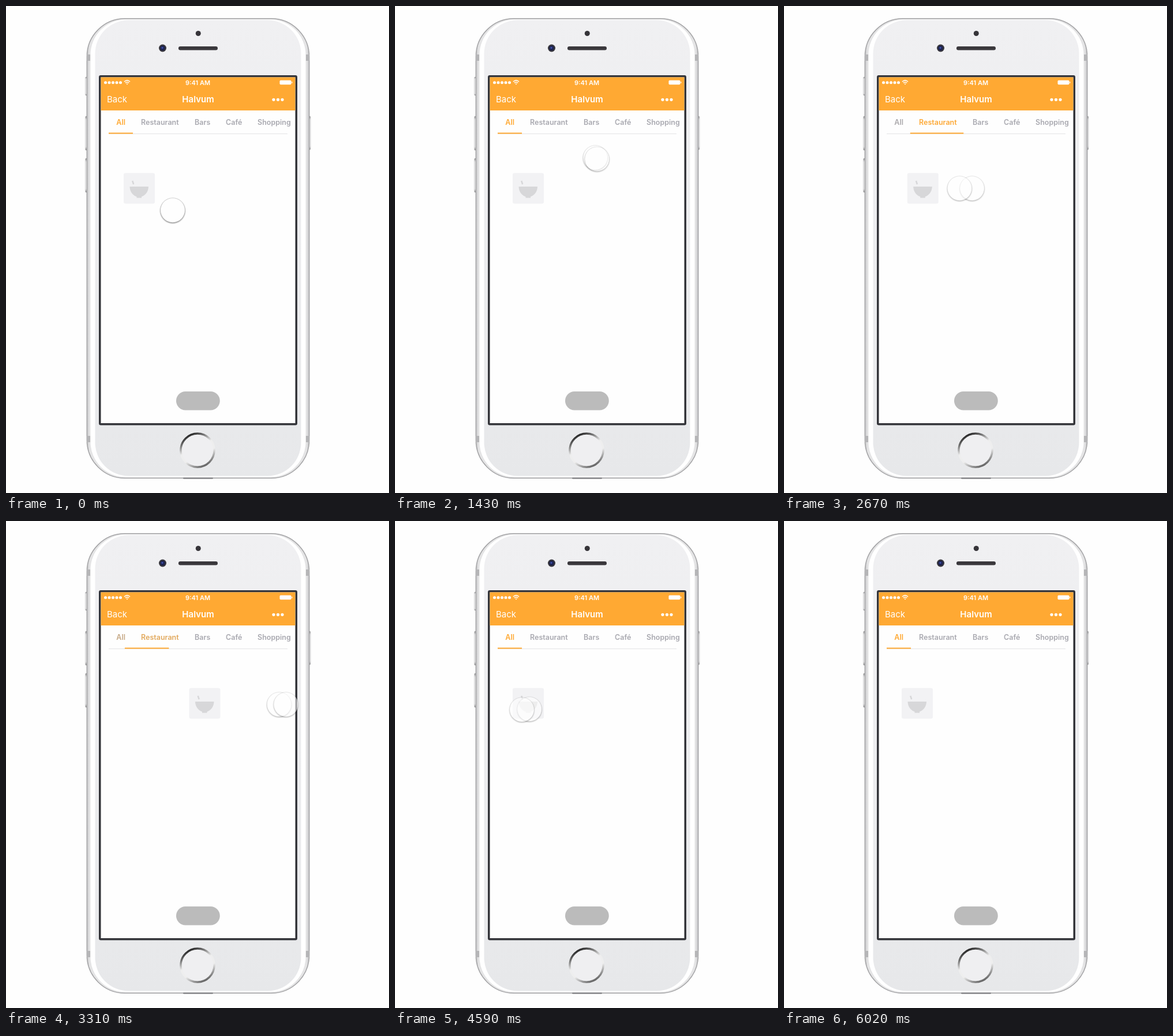
An HTML page that plays this animation: 664 px wide and 844 px high, repeating every 6440 ms.

```html
<!DOCTYPE html>
<html lang="en">
<head>
<meta charset="utf-8">
<title>Swipe between tabs</title>
<style>
  html, body { margin: 0; width: 100%; height: 100%; overflow: hidden; background: #fefefe; }
  svg { display: block; width: 664px; height: 844px; font-family: Inter, Roboto, sans-serif; }
  .tabs { font-size: 12.5px; font-weight: 600; fill: #a9a9b0; }
  .bar { fill: #fff; }
  .touch {
    fill: #fff; stroke: rgba(0, 0, 0, .16); stroke-width: .8; opacity: .55;
    filter: drop-shadow(0 1px 1.3px rgba(0, 0, 0, .55));
  }
</style>
</head>
<body>
<svg viewBox="0 0 664 844">
  <defs>
    <linearGradient id="rim">
      <stop offset="0" stop-color="#c4c4c6"/>
      <stop offset=".012" stop-color="#e4e4e5"/>
      <stop offset=".988" stop-color="#e4e4e5"/>
      <stop offset="1" stop-color="#c4c4c6"/>
    </linearGradient>
    <linearGradient id="face" x2="0" y2="1">
      <stop offset="0" stop-color="#f0f0f2"/>
      <stop offset="1" stop-color="#e7e8ea"/>
    </linearGradient>
    <linearGradient id="key" x2="0" y2="1">
      <stop offset="0" stop-color="#858587"/>
      <stop offset=".1" stop-color="#ececed"/>
      <stop offset=".9" stop-color="#ececed"/>
      <stop offset="1" stop-color="#858587"/>
    </linearGradient>
    <linearGradient id="ring" x1=".25" y1="0" x2=".75" y2="1">
      <stop offset="0" stop-color="#161616"/>
      <stop offset=".2" stop-color="#777"/>
      <stop offset=".42" stop-color="#eee"/>
      <stop offset=".65" stop-color="#eee"/>
      <stop offset="1" stop-color="#555"/>
    </linearGradient>
    <clipPath id="screen"><rect x="164" y="123" width="337.5" height="600"/></clipPath>
    <g id="card">
      <rect x="204" y="289.5" width="54" height="53" rx="3" fill="#f2f2f4"/>
      <g fill="#d7d7d9">
        <path d="M214.5 313h32.5c0 9-6 15.500-12 17.500v2h-8.500v-2c-6-2-12-8.500-12-17.500z"/>
        <path d="M219.200 303l2 6" stroke="#d7d7d9" stroke-width="2.5"/>
      </g>
    </g>
  </defs>

  <!-- Phone body -->
  <g fill="url(#key)" stroke="#bbb" stroke-width=".6">
    <rect x="137.500" y="123" width="5" height="32" rx="1.5"/>
    <rect x="137.500" y="191" width="5" height="59" rx="1.5"/>
    <rect x="137.500" y="264" width="5" height="59" rx="1.5"/>
    <rect x="523.500" y="191" width="4.5" height="58" rx="1.5"/>
  </g>
  <rect x="140.300" y="21.800" width="385.400" height="796.500" rx="66" fill="url(#rim)" stroke="#a4a4a6" stroke-width="1.5"/>
  <path d="M140 84h6v11h-6zM520 84h6v11h-6zM140 745h6v11h-6zM520 745h6v11h-6z" fill="#b5b5b7"/>
  <rect x="146.500" y="23.500" width="373" height="793" rx="61" fill="#fff"/>
  <rect x="154.500" y="24.500" width="357" height="790" rx="58" fill="url(#face)"/>
  <rect x="307" y="817.500" width="52" height="2" rx="1" fill="#77777a"/>
  <circle cx="333.300" cy="47.500" r="4.5" fill="#363439"/>
  <rect x="299" y="70" width="68" height="6.500" rx="3.2" fill="#3a383c"/>
  <circle cx="271.500" cy="73" r="6.5" fill="#37363d"/>
  <circle cx="271.500" cy="73" r="4" fill="#1b2150"/>
  <circle cx="271" cy="72.500" r="1.8" fill="#3c4ea0"/>
  <circle cx="332" cy="770" r="29" fill="#efeff1" stroke="url(#ring)" stroke-width="3.4"/>
  <rect x="162.750" y="121.750" width="340.500" height="603" rx="1.5" fill="#fefefe" stroke="#333439" stroke-width="3.5"/>

  <!-- Header -->
  <path d="M164.500 123.500H501.500V181H164.500z" fill="#ffa933"/>
  <g class="bar">
    <g id="signal"></g>
    <path d="M205 131.200q5-4.600 10 0M206.900 133.400q3.100-2.800 6.200 0" fill="none" stroke="#fff" stroke-width="1.5"/>
    <path d="M208.400 134.800q1.600-1.300 3.200 0l-1.600 1.700z"/>
    <text x="332.500" y="136.500" font-size="11" font-weight="600" text-anchor="middle">9:41 AM</text>
    <rect x="474.500" y="128.700" width="20" height="7.600" rx="1.8"/>
    <rect x="495.200" y="131" width="1.2" height="3" rx=".6"/>
    <text x="175" y="166.500" font-size="15">Back</text>
    <text x="333" y="166.500" font-size="15" font-weight="600" text-anchor="middle">Halvum</text>
    <g id="more"></g>
  </g>

  <!-- Tabs -->
  <g class="tabs">
    <text id="all" x="191.300" y="206">All</text>
    <text id="food" x="234" y="206">Restaurant</text>
    <text x="327" y="206">Bars</text>
    <text x="381" y="206">Café</text>
    <text x="436" y="206">Shopping</text>
  </g>
  <path d="M178 221.500H488" stroke="#e3e3e5"/>
  <rect id="line" y="219.500" height="2" fill="#ffa933"/>

  <g clip-path="url(#screen)">
    <g id="pages">
      <use href="#card"/>
      <use href="#card" x="338"/>
    </g>
  </g>
  <rect x="295" y="668" width="75.800" height="32.500" rx="16.2" fill="#bbb"/>

  <circle class="touch" r="21.2"/>
  <circle class="touch" r="21.2"/>
</svg>
<script>
const LOOP = 6440, PAGE = 338, PEEK = 200, LAG = 40, GONE = 6020;
const GRAY = [169, 169, 176], ORANGE = [255, 169, 51];
const $ = id => document.getElementById(id);

// Turning points of the hand: time, x, y
const hand = [
  [0, 289, 354], [920, 304, 348], [1290, 344, 260], [1930, 394, 302],
  [2020, 371, 308], [2250, 262, 314], [2590, 335, 316], [2840, 211, 316],
  [3340, 488, 318], [3900, 381, 317], [4050, 379, 317], [4792, 185, 329],
  [5152, 479, 336], [5500, 321, 331], [GONE, 611, 890]
];

const mix = (a, b, p) => a + (b - a) * p;
const tint = p => `rgb(${GRAY.map((g, i) => Math.round(mix(g, ORANGE[i], p)))})`;

function ease(t, from, to) {
  const u = Math.min(1, Math.max(0, (t - from) / (to - from)));
  return u * u * (3 - 2 * u);
}

// Each leg eases between two turning points
function handAt(t) {
  const next = hand.findIndex(key => key[0] > t);
  if (next < 1) return hand[t < 0 ? 0 : hand.length - 1].slice(1);
  const [from, x, y] = hand[next - 1], [to, x2, y2] = hand[next];
  const p = ease(t, from, to);
  return [mix(x, x2, p), mix(y, y2, p)];
}

// One full swipe there and back, then a shorter peek
function scrollAt(t) {
  const swipe = ease(t, 2060, 2740) - ease(t, 3000, 3800);
  const peek = ease(t, 4700, 4920) - ease(t, 4940, 5160);
  return PAGE * swipe + PEEK * peek;
}

function dots(id, count, x, y, gap, r) {
  for (let i = 0; i < count; i++)
    $(id).innerHTML += `<circle cx="${x + i * gap}" cy="${y}" r="${r}"/>`;
}
dots('signal', 5, 172.5, 132.7, 6.5, 2.5);
dots('more', 3, 464, 162.3, 7.5, 2.6);
const touches = document.querySelectorAll('.touch');

function draw(t) {
  const x = scrollAt(t), p = x / PAGE;
  $('pages').setAttribute('transform', `translate(${-x} 0)`);

  const left = mix(178, 220, p);
  $('line').setAttribute('x', left);
  $('line').setAttribute('width', mix(220, 314, p) - left);
  $('all').style.fill = tint(1 - p);
  $('food').style.fill = tint(p);

  // The trailing copy gives the motion its double image
  touches.forEach((c, i) => {
    c.setAttribute('transform', `translate(${handAt(t - (1 - i) * LAG)})`);
    c.style.display = t < GONE ? '' : 'none';
  });
}

const start = performance.now();
function tick() {
  draw((performance.now() - start) % LOOP);
  requestAnimationFrame(tick);
}
tick();
</script>
</body>
</html>
```
